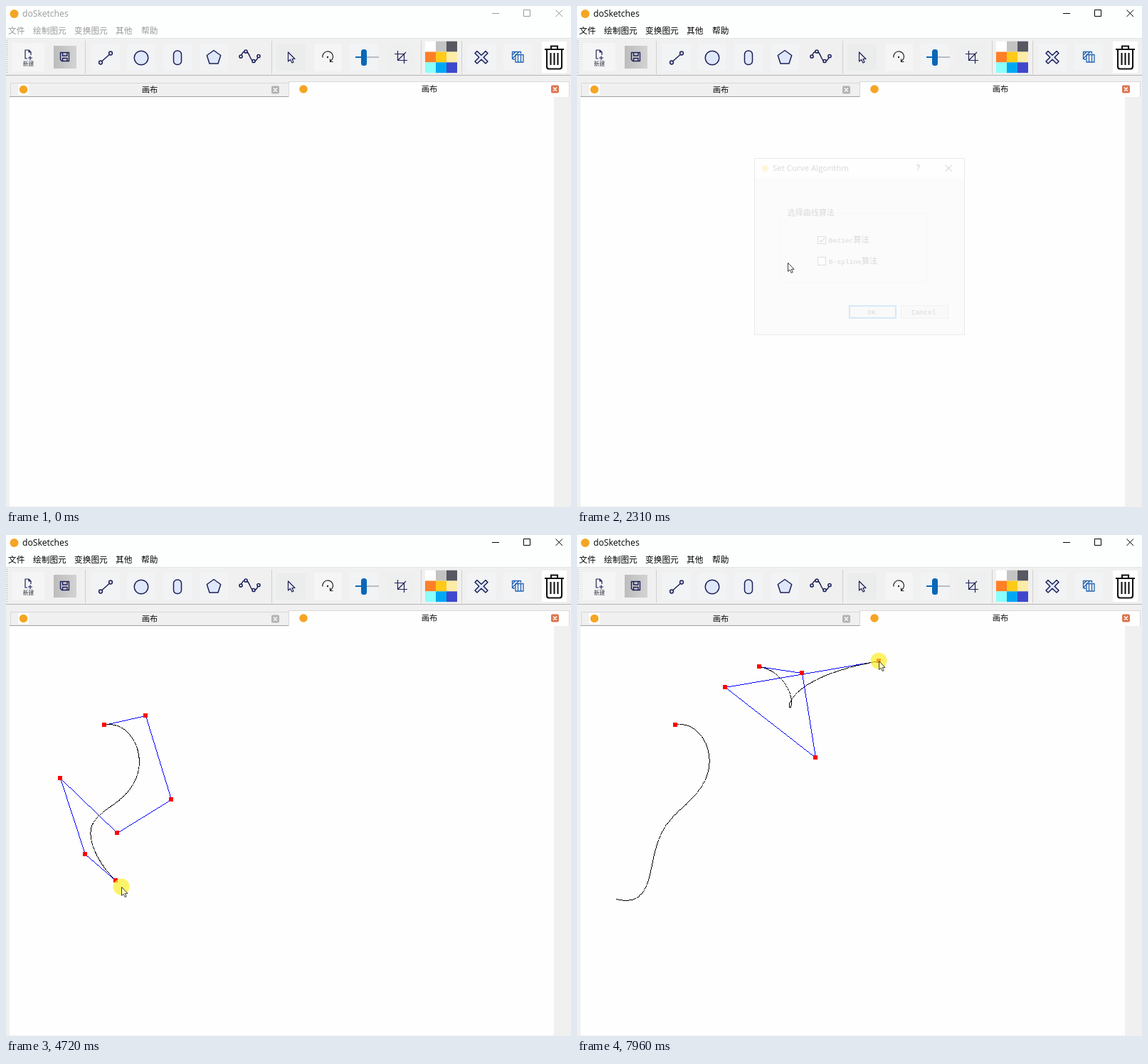
Recreate the animation shown at these times as an HTML page with a canvas. Size 794 by 705 pixels, loop 8 s.

```html
<!DOCTYPE html>
<html lang="zh-CN">
<head>
<meta charset="utf-8">
<title>doSketches</title>
<style>
  html, body { margin: 0; width: 100%; height: 100%; overflow: hidden; background: #f0f0f0; }
  svg, canvas { position: absolute; left: 0; top: 0; }
  text { font: 11.7px "Noto Sans CJK SC", "Noto Sans CJK", sans-serif; fill: #111; }
  .latin { font: 12.2px "Open Sans", "Noto Sans", sans-serif; }
  .mono { font: 10px "Liberation Mono", "Noto Sans Mono", monospace; }
  .mid { text-anchor: middle; }
  .crisp { shape-rendering: crispEdges; }
  .chrome { --ink: #000; }
  .chrome.idle { --ink: #999; }
  .chrome text { fill: var(--ink); }
  .chrome path { stroke: var(--ink); fill: none; }
  .icon { fill: none; stroke: #1d2058; stroke-width: 1.5; stroke-linejoin: round; }
  .soft { fill: #dfe7fb; }
  .logo { fill: #f5a524; }
</style>
</head>
<body>
<svg width="794" height="705">
  <!-- window frame -->
  <rect width="794" height="705" fill="#f0f0f0"/>
  <rect width="794" height="45" fill="#fdfefe"/>
  <circle class="logo" cx="11.5" cy="11" r="6"/>
  <g id="chrome" class="chrome">
    <text class="latin" x="23" y="15">doSketches</text>
    <text x="3" y="39">文件</text>
    <text x="38" y="39">绘制图元</text>
    <text x="96" y="39">变换图元</text>
    <text x="154" y="39">其他</text>
    <text x="190" y="39">帮助</text>
    <path d="M683 10.5H693M727.5 5.5H736.5V14.5H727.5Z"/>
    <path d="M772.5 5.5L782 15M782 5.5L772.5 15"/>
  </g>

  <!-- toolbar -->
  <g class="crisp">
    <rect y="45" width="794" height="1" fill="#e3e3e3"/>
    <rect y="97" width="794" height="1" fill="#b4b4b4"/>
    <path d="M1.5 48V96" stroke="#aaa" stroke-dasharray="1 2"/>
    <path d="M111.5 49V96M373.5 49V96M583.5 49V96M640.5 49V96" stroke="#cfcfcf"/>
    <rect x="8" y="52" width="46" height="40" fill="#f5f5f5"/>
    <path d="M120 53h40v38h-40zM170 53h40v38h-40zM221 53h40v38h-40zM272 53h40v38h-40zM483 53h40v38h-40zM648 53h40v38h-40zM699 53h40v38h-40z" fill="#f1f3f4"/>
    <rect x="380" y="54" width="41" height="37" fill="#ebecec"/>
    <rect x="433" y="53" width="39" height="39" fill="#f5f5f5"/>
    <rect x="536" y="53" width="37" height="38" fill="#eeefef"/>
  </g>
  <linearGradient id="steel"><stop stop-color="#bcbcbc"/><stop offset="1" stop-color="#d3d3d3"/></linearGradient>
  <rect x="67" y="56" width="32" height="32" fill="url(#steel)"/>
  <g class="icon">
    <path stroke-width="1.2" d="M30 74H27V62H32L35 65V69M32 62V65H35M34 70.5V76M31 73H37"/>
    <path stroke-width="1.4" d="M76.5 65.5H88.5V77.5H78.5L76.5 75.5ZM79.5 65.5V70H86V65.5M79.5 77.5V73.5H86V77.5"/>
    <path d="M135 77.5L145 68.5"/>
    <circle class="soft" cx="133" cy="79.5" r="2.4"/><circle class="soft" cx="147" cy="66.5" r="2.4"/>
    <circle class="soft" cx="190" cy="73" r="9.8"/>
    <rect class="soft" x="235.5" y="63" width="11" height="19.5" rx="5"/>
    <path class="soft" d="M292 62.5L301.7 69.5L298 81H286L282.3 69.5Z"/>
    <path d="M330 71C332 65 335 63 338 64C343 67 343 77 348 78C352 78 353 74 355 71"/>
    <circle class="soft" cx="330" cy="71" r="2.1"/><circle class="soft" cx="337" cy="64" r="2.1"/>
    <circle class="soft" cx="348" cy="77.5" r="2.1"/><circle class="soft" cx="355" cy="70.5" r="2.1"/>
    <path stroke-width="1.2" d="M396.5 65V78L399.5 75.5L402 80L404 79L402 74.5H406Z"/>
    <path stroke-width="1.2" stroke="#222" d="M445 72.5A7.3 7.3 0 1 1 456 77.5M455.5 74.5V78.5H459.5"/>
    <circle cx="452" cy="72" r="1.2" fill="#222" stroke="none"/>
    <path stroke-width="1.2" d="M550.5 63V76.5H564M546 67.5H559.5V81M550.5 76.5L562 65"/>
    <path class="soft" d="M662 63.5L668 69.3L674 63.5L677 66.5L671.2 72.3L677 78L674 81L668 75.3L662 81L659 78L664.8 72.3L659 66.5Z"/>
    <g stroke="#2464b4" stroke-width="1.3">
      <path d="M711.5 75V64.5H723.5V67M711.5 69L716 64.5M711.5 74L721 64.5M712 75H715"/>
      <path d="M716 68.5H727V79H716ZM719.5 68.5V79M723.5 68.5V79"/>
    </g>
  </g>
  <text x="23.7" y="84" style="font-size:7.8px;fill:#334">新建</text>
  <rect x="491" y="71" width="12" height="2" fill="#0a68b8"/>
  <rect x="506" y="71" width="18" height="2" fill="#b9bcc4"/>
  <rect x="499" y="61" width="8" height="23" rx="3.5" fill="#0867b7"/>
  <g id="palette"></g>
  <rect x="753" y="50" width="35" height="44" fill="#fff"/>
  <path d="M757 61H784M766 60V56.5H775V60M760 62V85Q760 88.5 763 88.5H778Q781 88.5 781 85V62M765.5 66V83M770.5 66V83M775.5 66V83" fill="none" stroke="#111" stroke-width="2.1"/>

  <!-- tabs and canvas -->
  <g class="crisp">
    <rect x="5" y="128" width="765" height="576" fill="#fefefe"/>
    <path d="M6.5 127V108.5H397" fill="none" stroke="#d9d9d9"/>
    <path d="M5 127.5H397" stroke="#a0a0a0"/>
    <path d="M397.5 128V106.5H791.5V128" fill="#fefefe" stroke="#d9d9d9"/>
    <rect x="17" y="110" width="15" height="15" fill="#fff"/>
  </g>
  <circle class="logo" cx="24.5" cy="117.5" r="5.8"/>
  <circle class="logo" cx="418" cy="117" r="5.8"/>
  <text class="mid" x="202" y="121.5" style="font-size:11.3px">画布</text>
  <text class="mid" x="595" y="121" style="font-size:11.3px">画布</text>
  <rect x="373" y="112.5" width="11" height="11" rx="2" fill="#b3b3b3"/>
  <rect x="766" y="111.5" width="11" height="11" rx="2" fill="#dd754f"/>
  <path d="M376 115.5l5 5m0-5l-5 5M769 114.5l5 5m0-5l-5 5" stroke="#fff" stroke-width="1.5"/>
</svg>

<canvas id="art" width="794" height="705"></canvas>

<svg width="794" height="705">
  <g id="dialog">
    <g class="crisp">
      <rect x="243.5" y="209.5" width="307" height="258" fill="#f0f0f0" stroke="#737c80"/>
      <rect x="244" y="210" width="306" height="28" fill="#fff"/>
      <rect x="282.5" y="289.5" width="214" height="101" fill="none" stroke="#dcdcdc"/>
      <rect x="288" y="285" width="76" height="9" fill="#f0f0f0"/>
      <rect id="bezierBox" x="336.5" y="323.5" width="11" height="11"/>
      <rect x="336.5" y="354.5" width="11" height="11" fill="#fff" stroke="#333"/>
      <rect x="382" y="425" width="68" height="18" fill="#e1e1e1" stroke="#0078d7" stroke-width="2"/>
      <rect x="457.5" y="424.5" width="69" height="19" fill="#e1e1e1" stroke="#adadad"/>
    </g>
    <rect x="253" y="218" width="12" height="12" fill="#fff6dc"/>
    <circle cx="259" cy="224" r="4.3" fill="#ffbf0f"/>
    <text class="latin" x="270" y="228" style="font-size:12px">Set Curve Algorithm</text>
    <text class="latin" x="480" y="228" style="font-weight:600">?</text>
    <path d="M522.5 219L532 228.5M532 219L522.5 228.5" stroke="#111" stroke-width="1.1"/>
    <text x="291.5" y="293.5" style="font-size:11.5px">选择曲线算法</text>
    <text x="352" y="333"><tspan class="mono">Bezier</tspan>算法</text>
    <text x="352" y="364"><tspan class="mono">B-spline</tspan>算法</text>
    <path id="check" d="M338.5 329L341 331.8L346 326" fill="none" stroke="#222" stroke-width="1.2"/>
    <text class="mono mid" x="415" y="438">OK</text>
    <text class="mono mid" x="491" y="438">Cancel</text>
  </g>
  <circle id="halo" r="11.5" fill="#fbee20" opacity=".68"/>
  <path id="cursor" d="M.5 .5V12.5L3.2 10.2L5.2 14.6L7.2 13.7L5.3 9.4H9Z" fill="#fff" fill-opacity=".65" stroke="#333" stroke-width=".95"/>
</svg>
<script>
const LOOP = 8000, APPEAR = 840, CLOSE = 2200, FINISH = 5960;
const $ = id => document.getElementById(id);
const show = (el, on) => el.setAttribute('visibility', on ? 'visible' : 'hidden');
const clamp = (v, lo = 0, hi = 1) => Math.max(lo, Math.min(hi, v));
const mix = (a, b, k) => a + (b - a) * k;
const mixPoint = (p, q, k) => [mix(p[0], q[0], k), mix(p[1], q[1], k)];

const swatches = ['#fff', '#c3c3c3', '#585862', '#ff7f27', '#ffca18', '#fdeca6', '#8cfffb', '#00a8f3', '#3f48cc'];
$('palette').innerHTML = swatches.map((color, i) =>
  `<rect x="${589 + i % 3 * 15}" y="${49.7 + (i / 3 | 0) * 14.8}" width="15" height="14.8" fill="${color}"/>`).join('');

// every stop: arrival time, x, y
const tickBox = [1330, 379, 322], ok = [2010, 399, 422];
const sCurve = [[2600, 138, 267], [2930, 196, 254], [3260, 232, 372], [3560, 156, 419],
  [4000, 76, 342], [4390, 111, 449], [4630, 154, 486], [5180, 55, 512]];
const loopCurve = [[6370, 256, 185], [6630, 316, 194], [7020, 335, 313], [7430, 208, 214], [7880, 424, 177]];
const grab = sCurve[6], drop = [4900, 124, 529];

const clicks = [tickBox, ok, ...sCurve, ...loopCurve];
const stops = [[APPEAR, 352, 215], [1770, 399, 422], [4720, 162, 495], drop,
  [5650, 207, 452], [6120, 218, 450], ...clicks].sort((a, b) => a[0] - b[0]);

const pressed = (click, t) => t >= click[0] + 10 && t < click[0] + 90;

// rest at a stop, then ease over to reach the next one on time
function cursorAt(t) {
  const next = stops.findIndex(s => s[0] > t);
  if (next < 1) return stops.at(next).slice(1);
  const [t0, ...from] = stops[next - 1], [t1, ...to] = stops[next];
  const travel = Math.min(.86 * (t1 - t0), 2.5 * Math.hypot(to[0] - from[0], to[1] - from[1]));
  const u = travel ? clamp(1 - (t1 - t) / travel) : 0;
  return mixPoint(from, to, u * u * (3 - 2 * u));
}

const ctx = $('art').getContext('2d');

// aliased one-pixel line
function line([x0, y0], [x1, y1]) {
  const steps = Math.max(1, Math.round(Math.max(Math.abs(x1 - x0), Math.abs(y1 - y0))));
  for (let i = 0; i <= steps; i++)
    ctx.fillRect(Math.round(mix(x0, x1, i / steps)), Math.round(mix(y0, y1, i / steps)), 1, 1);
}

function polyline(pts, color) {
  ctx.fillStyle = color;
  for (let i = 1; i < pts.length; i++) line(pts[i - 1], pts[i]);
}

function bezier(pts, u) {
  while (pts.length > 1) pts = pts.slice(1).map((p, i) => mixPoint(pts[i], p, u));
  return pts[0];
}

function drawCurve(points, t, editing) {
  // a dragged point trails the cursor
  const ctrl = points.filter(p => p[0] + 10 <= t)
    .map(p => p === grab ? cursorAt(clamp(t - 90, grab[0], drop[0])) : p.slice(1));
  if (!ctrl.length) return;
  if (editing) polyline(ctrl, '#00f');
  polyline(Array.from({ length: 121 }, (_, i) => bezier(ctrl, i / 120)), '#000');
  ctx.fillStyle = '#f00';
  for (const [x, y] of editing ? ctrl : ctrl.slice(0, 1))
    ctx.fillRect(Math.round(x) - 3, Math.round(y) - 3, 6, 6);
}

function drawDialog(t) {
  const opening = clamp((t - 70) / 200), closing = clamp((t - CLOSE) / 130);
  const alpha = opening * (1 - closing);
  const scale = 1 - .1 * (1 - opening) ** 2 - .046 * closing;
  show($('dialog'), alpha > 0);
  $('dialog').setAttribute('opacity', alpha);
  $('dialog').setAttribute('transform', `translate(397 338.5) scale(${scale}) translate(-397 -338.5)`);
  const down = pressed(tickBox, t), hover = t >= 1200 && t < 1740;
  $('bezierBox').setAttribute('fill', down ? '#cce4f7' : '#fff');
  $('bezierBox').setAttribute('stroke', down ? '#005499' : hover ? '#0078d7' : '#333');
  $('check').style.display = t >= tickBox[0] + 90 ? '' : 'none';
}

function render(t) {
  $('chrome').classList.toggle('idle', t < CLOSE);
  drawDialog(t);
  ctx.clearRect(0, 0, 794, 705);
  drawCurve(sCurve, t, t < FINISH);
  drawCurve(loopCurve, t, true);
  const place = `translate(${cursorAt(t).map(Math.round).join(' ')})`;
  for (const id of ['cursor', 'halo']) $(id).setAttribute('transform', place);
  show($('cursor'), t >= APPEAR);
  show($('halo'), clicks.some(c => pressed(c, t)) || t >= grab[0] && t < drop[0]);
}

let start;
function frame(now) {
  start ??= now;
  render((now - start) % LOOP);
  requestAnimationFrame(frame);
}
render(0);
requestAnimationFrame(frame);
</script>
</body>
</html>
```
